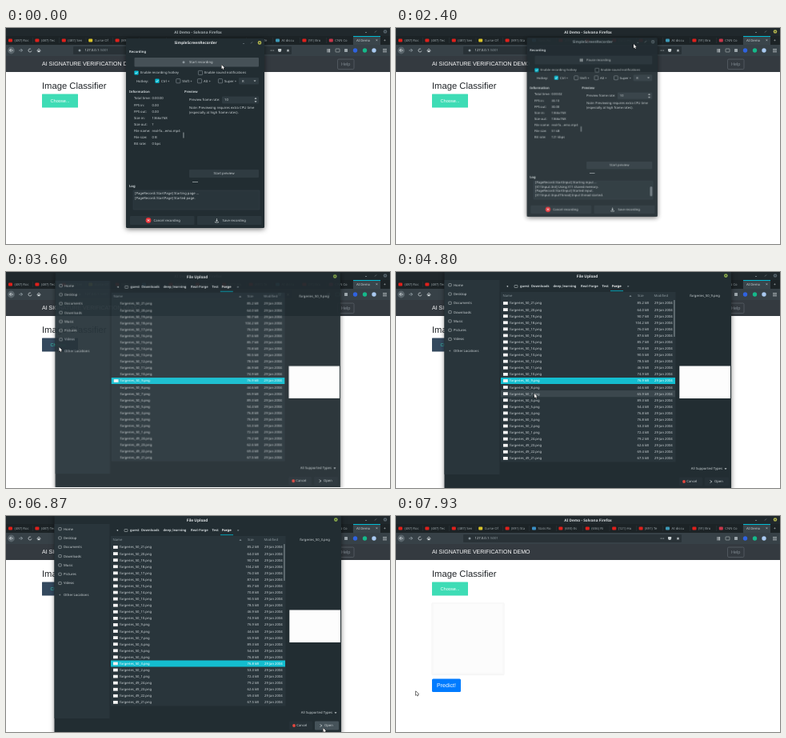
Recreate the animation shown at these times as an HTML page with a canvas. Size 480x270 px, loop 8 s.

```html
<!DOCTYPE html>
<html lang="en">
<head>
<meta charset="utf-8">
<title>AI Demo</title>
<style>
  html, body { margin: 0; width: 100%; height: 100%; overflow: hidden; background: #fff; }
  canvas { display: block; width: 480px; height: 270px; }
</style>
</head>
<body>
<canvas id="stage"></canvas>
<script>
const W = 480, H = 270, LOOP = 8000;
const UI = '"Noto Sans", sans-serif', WEB = '"Liberation Sans", Arial, sans-serif';
const SYMBOL = '"DejaVu Sans", sans-serif';
const TEAL = '#00bcd4', LIGHT = '#c9d0d3', DIM = '#8b979d', BASE = '#29353b', BG = '#222d32';
const ratio = window.devicePixelRatio || 1;

function prepare(canvas) {
  canvas.width = W * ratio;
  canvas.height = H * ratio;
  const context = canvas.getContext('2d');
  context.scale(ratio, ratio);
  context.textRendering = 'geometricPrecision';
  return context;
}
const screen2d = prepare(document.getElementById('stage'));
const layer2d = prepare(document.createElement('canvas'));
let ctx = screen2d;

const clamp = v => Math.max(0, Math.min(1, v));
const progress = (t, start, length) => clamp((t - start) / length);
const easeOut = p => 1 - (1 - p) ** 2;
const smooth = p => p * p * (3 - 2 * p);

// ---- drawing helpers ----
function box(x, y, w, h, fill, radius = 0, stroke) {
  ctx.beginPath();
  ctx.roundRect(x, y, w, h, radius);
  if (fill) { ctx.fillStyle = fill; ctx.fill(); }
  if (stroke) { ctx.strokeStyle = stroke; ctx.lineWidth = 0.5; ctx.stroke(); }
}
function dot(x, y, r, fill) { box(x - r, y - r, 2 * r, 2 * r, fill, r); }
function line(color, width, ...points) {
  ctx.beginPath();
  for (let i = 0; i < points.length; i += 2) ctx.lineTo(points[i], points[i + 1]);
  ctx.strokeStyle = color;
  ctx.lineWidth = width;
  ctx.stroke();
}
// y is the middle of the capitals
function text(s, x, y, { size = 4.22, color = LIGHT, bold = false, align = 'left', font = UI } = {}) {
  ctx.font = `${bold ? 'bold ' : ''}${size}px ${font}`;
  ctx.fillStyle = color;
  ctx.textAlign = align;
  ctx.fillText(s, x, y + size * 0.355);
}
function caret(x, y, up = false, color = LIGHT) {
  const d = up ? -1 : 1;
  ctx.beginPath();
  ctx.moveTo(x - 1.5, y - 0.8 * d);
  ctx.lineTo(x + 1.5, y - 0.8 * d);
  ctx.lineTo(x, y + 0.9 * d);
  ctx.fillStyle = color;
  ctx.fill();
}
function shadowBox(x, y, w, h, fill, radius, { color = 'rgba(0,0,0,.55)', blur = 6, drop = 1.5 } = {}) {
  ctx.save();
  ctx.shadowColor = color;
  ctx.shadowBlur = blur * ratio;
  ctx.shadowOffsetY = drop * ratio;
  box(x, y, w, h, fill, radius);
  ctx.restore();
}
// Draws a window off screen, then places it with one opacity and scale.
function composite(draw, alpha, scale, fromX, fromY, toX = fromX, toY = fromY) {
  if (alpha <= 0) return;
  ctx = layer2d;
  ctx.clearRect(0, 0, W, H);
  draw();
  ctx = screen2d;
  ctx.save();
  ctx.globalAlpha = alpha;
  ctx.translate(toX, toY);
  ctx.scale(scale, scale);
  ctx.drawImage(layer2d.canvas, -fromX, -fromY, W, H);
  ctx.restore();
}

// ---- pointer ----
const path = [
  [270, 269.5, 46], [1070, 300, 23.5], [1270, 300, 23.5], [1400, 297, 20], [2400, 297, 20],
  [3100, 66.5, 94], [3930, 66.5, 94], [4530, 173, 152], [4800, 173, 152], [5200, 175, 183],
  [5670, 175, 183], [5870, 340, 255], [6470, 393, 262], [6600, 396.5, 265], [6930, 396.5, 265],
  [7720, 24.7, 219]
];
function pointerAt(t) {
  const next = path.findIndex(k => k[0] > t);
  if (next === 0) return path[0].slice(1);
  if (next < 0) return path.at(-1).slice(1);
  const [t0, x0, y0] = path[next - 1], [t1, x1, y1] = path[next];
  const p = smooth((t - t0) / (t1 - t0));
  return [x0 + (x1 - x0) * p, y0 + (y1 - y0) * p];
}
function drawPointer(x, y) {
  ctx.save();
  ctx.translate(x, y);
  ctx.beginPath();
  for (const [px, py] of [[0, 0], [0, 5.2], [1.2, 4.1], [2.1, 6], [2.9, 5.6], [2.1, 3.8], [3.7, 3.7]]) ctx.lineTo(px, py);
  ctx.closePath();
  ctx.strokeStyle = '#111';
  ctx.lineWidth = 1;
  ctx.stroke();
  ctx.fillStyle = '#fff';
  ctx.fill();
  ctx.restore();
}

// ---- browser and page ----
const RED = '#e0201b';
const tabs = [
  ['(487) Roc', RED], ['(487) Tec', RED], ['(487) Sen', RED], ['Curse Of', '#d8c22a'], ['(891) Sta', RED],
  ['Stats Ro', '#3b8fc4'], ['(693) Es', RED], ['(656) Ri', RED], ['(121) Ho', RED], ['(891) Te', RED],
  ['AI discu', '#3c9ab8'], ['(91) Bro', RED], ['CNN Co', '#c8364a']
];
function windowButtons(x, y, active, gap = 12) {
  box(x - 2 * gap - 1, y + 0.6, 2, 0.6, DIM);
  line(DIM, 0.6, x - gap - 1, y + 1, x - gap + 1, y - 1);
  dot(x, y, 2.3, active ? '#b3b54c' : '#56636a');
  dot(x, y, 0.8, BG);
}
function drawBrowser(t) {
  const active = t > 2330 && (t < 3270 || t > 6900);
  box(0, 0, W, H, '#fff');
  box(0, 0, W, 10, '#20282c');
  text('AI Demo - Solvana Firefox', 240, 5, { size: 4.7, bold: true, align: 'center', color: active ? '#d5dadc' : '#a5aeb2' });
  windowButtons(474, 4.5, active);

  box(0, 10, W, 11, '#1c2326');
  tabs.forEach(([label, color], i) => {
    const x = 3 + 33.4 * i;
    box(x, 13.5, 5, 4, color, 1);
    text(label, x + 7.5, 15.5, { color: '#98a2a6' });
    box(x + 30, 12, 0.4, 7, '#333d42');
  });
  box(434, 10, 34, 11, '#3a454b');
  box(434, 10, 34, 0.9, TEAL);
  text('AI Demo', 438, 15.5);
  text('×', 462, 15.5, { size: 5 });
  text('+', 472, 15.5, { size: 5 });

  box(0, 21, W, 14, '#374147');
  dot(6.5, 28, 4.4, '#59646a');
  line(LIGHT, 0.8, 9, 28, 4.5, 28, 6.5, 26, 4.5, 28, 6.5, 30);
  line(DIM, 0.8, 16, 28, 20.5, 28, 18.5, 26, 20.5, 28, 18.5, 30);
  ctx.beginPath();
  ctx.arc(30, 28, 2, 0.2, 5.3);
  ctx.strokeStyle = LIGHT;
  ctx.lineWidth = 0.8;
  ctx.stroke();
  line(LIGHT, 0.8, 38.5, 28.3, 41, 26, 43.5, 28.3);
  box(39.5, 28, 3, 2.2, LIGHT);
  box(84, 23, 273, 10, '#293237', 1);
  dot(92, 28, 1.5, DIM);
  text('127.0.0.1', 98.5, 28);
  text(':5001', 117, 28, { color: DIM });
  for (let i = 0; i < 3; i++) dot(331 + 1.8 * i, 28, 0.5, LIGHT);
  box(340, 26, 4.2, 4, LIGHT, [0.5, 0.5, 2, 2]);
  text('★', 350, 28, { size: 5.5, font: SYMBOL });
  for (let i = 0; i < 3; i++) box(401.5 + 1.4 * i, 26, 0.8, 4.5, LIGHT);
  box(412, 26, 5, 4, null, 0.5, LIGHT);
  box(423, 26, 4, 4, '#9da7ac', 0.5);
  dot(436.5, 28, 2.7, '#2f63e0');
  dot(448.5, 28, 2.7, '#15b98a');
  dot(460, 28, 2.7, '#a9c9f0');
  for (let i = 0; i < 3; i++) box(471, 26 + 1.8 * i, 5, 0.7, LIGHT);

  box(0, 35, W, 20, '#343a40');
  text('AI SIGNATURE VERIFICATION DEMO', 45, 44.7, { size: 7.03, font: WEB, color: '#fff' });
  box(414.5, 39, 20.5, 12.5, null, 1.4, '#6c757d');
  text('Help', 424.7, 45, { size: 5.62, font: WEB, color: '#7c858c', align: 'center' });

  text('Image Classifier', 45, 71.8, { size: 11.24, font: WEB, color: '#212529' });
  const hovered = t > 2980 && t < 7150;
  box(45, 82.5, 45, 17, hovered ? '#34495e' : '#3edcb5', 0.5);
  text('Choose...', 67.5, 91, { size: 5.62, font: WEB, color: hovered ? '#39d2b4' : '#fff', align: 'center' });

  if (t > 7250) {
    shadowBox(45, 108, 90, 90, '#f8f8f8', 0, { color: 'rgba(0,0,0,.12)', blur: 1.5, drop: 0.7 });
    ctx.globalAlpha = progress(t, 7250, 650);
    box(46.7, 109.7, 86.6, 86.6, '#fcfcfc');
    ctx.globalAlpha = 1;
    box(45, 203.5, 36, 16.5, '#007bff', 1.5);
    text('Predict!', 63, 211.6, { size: 7.03, font: WEB, color: '#fff', align: 'center' });
  }
}

// ---- recorder ----
function checkbox(x, y, label, checked) {
  box(x - 2.6, y - 2.6, 5.2, 5.2, checked ? TEAL : null, 0.8, checked ? null : '#9aa5aa');
  if (checked) line('#fff', 0.7, x - 1.5, y, x - 0.4, y + 1.2, x + 1.6, y - 1.2);
  text(label, x + 5, y);
}
function button(x, y, w, h, label, fill = '#2c383e') {
  box(x, y, w, h, fill, 1);
  text(label, x + w / 2 + 6, y + h / 2, { align: 'center' });
}
function drawRecorder(t, pointer) {
  const recording = t >= 100, focused = t < 2330;
  const seconds = t < 870 ? 0 : t < 1870 ? 1 : 2;
  const fresh = recording && t > 270;
  const heading = (s, x, y) => text(s, x, y, { bold: true });

  shadowBox(150, 13, 173, 237, BG, 1.5);
  text('SimpleScreenRecorder', 237, 18.7, { size: 4.75, bold: true, align: 'center', color: focused ? '#e0e4e6' : DIM });
  windowButtons(317, 18.4, focused, 10);

  heading('Recording', 154, 30);
  const hover = pointer[1] > 37 && pointer[1] < 48;
  box(160.5, 37, 155.5, 11.5, hover ? '#465157' : '#2c383e', 1);
  if (recording) {
    box(220.5, 40.8, 1.2, 4, LIGHT);
    box(222.8, 40.8, 1.2, 4, LIGHT);
  } else dot(222, 42.8, 1.5, DIM);
  text(recording ? 'Pause recording' : 'Start recording', 229, 42.8);

  checkbox(163, 56, 'Enable recording hotkey', true);
  checkbox(243, 56, 'Enable sound notifications', false);
  text('Hotkey:', 163, 66.2);
  checkbox(189, 66.2, 'Ctrl +', true);
  checkbox(215.3, 66.2, 'Shift +');
  checkbox(242, 66.2, 'Alt +');
  checkbox(268, 66.2, 'Super +');
  box(291, 62, 25, 8.5, '#2f3b41', 1);
  text('R', 295, 66.2);
  caret(311, 66.2);

  heading('Information', 154, 80);
  [
    ['Total time:', `0:00:0${seconds}`],
    ['FPS in:', !fresh ? '0.00' : seconds < 2 ? '29.84' : '30.10'],
    ['FPS out:', !fresh ? '0.00' : '30.00'],
    ['Size in:', '1366x768'],
    ['Size out:', recording ? '1366x768' : '?'],
    ['File name:', 'real-fo...emo.mp4'],
    ['File size:', ['0 B', '36 kB', '51 kB'][seconds]],
    ['Bit rate:', ['0 bps', '118 kbps', '121 kbps'][seconds]]
  ].forEach(([label, value], i) => {
    text(label, 160, 88 + 8.1 * i);
    text(value, 182.5, 88 + 8.1 * i);
  });
  box(221.6, 130.5, 0.7, 7, LIGHT);

  heading('Preview', 223, 80);
  text('Preview frame rate:', 229, 90);
  box(270, 85.5, 46, 9, '#2f3b41', 1);
  text('10', 273, 90);
  caret(312, 88, true);
  caret(312, 92);
  text('Note: Previewing requires extra CPU time', 229, 99.7);
  text('(especially at high frame rates).', 229, 105.2);
  box(229, 177, 87, 10, '#2f3b41', 1);
  text('Start preview', 272.5, 182, { align: 'center' });
  box(233, 192.4, 7, 0.6, LIGHT);

  heading('Log', 154, 198);
  box(159, 203, 158, 24, BASE, 0.5, '#35434a');
  const log = recording
    ? ['[PageRecord::StartInput] Starting input ...', '[X11Input::Init] Using X11 shared memory.',
       '[PageRecord::StartInput] Started input.', '[X11Input::InputThread] Input thread started.']
    : ['[PageRecord::StartPage] Starting page ...', '[PageRecord::StartPage] Started page.'];
  const top = recording ? 204.3 : 207;
  log.forEach((entry, i) => text(entry, 161, top + 5.75 * i));
  if (recording) box(313, 210, 3.2, 13, '#69757b', 1.5);

  button(155, 235, 80.5, 11, 'Cancel recording');
  dot(178, 240.5, 3.4, '#e5353b');
  line('#fff', 0.9, 176.8, 239.3, 179.2, 241.7);
  line('#fff', 0.9, 179.2, 239.3, 176.8, 241.7);
  button(239, 235, 80.5, 11, 'Save recording');
  line(LIGHT, 0.7, 263.5, 238, 263.5, 241.5);
  caret(263.5, 241);
  line(LIGHT, 0.7, 261.5, 242, 261.5, 243, 265.5, 243, 265.5, 242);
}

// ---- file dialog ----
const sizes = [85.2, 64.0, 90.7, 104.2, 76.0, 87.6, 85.7, 70.8, 90.5, 78.5, 46.9, 74.9, 76.9,
  44.6, 65.9, 89.3, 54.4, 76.8, 76.8, 53.3, 72.4, 79.2, 62.6, 69.4, 67.5];
const fileName = i => `forgeries_${i < 21 ? `50_${21 - i}` : `49_${45 - i}`}.png`;
const ROW = 8.08;

function drawDialog(t, [px, py]) {
  const selected = t < 5230 ? 12 : 18;
  const iconsLoaded = t > 3700;
  shadowBox(60.5, -2, 358.5, 274, BG);
  text('File Upload', 239, 5, { size: 4.75, bold: true, align: 'center', color: '#e0e4e6' });
  dot(412.3, 4.6, 2.3, '#8fb04c');
  dot(412.3, 4.6, 0.8, BG);

  box(60.5, 10, 69, 243, BASE);
  ['Home', 'Desktop', 'Documents', 'Downloads', 'Music', 'Pictures', 'Videos'].forEach((place, i) => {
    const y = 16.2 + 11.3 * i;
    box(65.7, y - 1.6, 3.6, 3.2, null, 0.6, LIGHT);
    text(place, 72, y);
  });
  text('+', 66, 98.3);
  text('Other Locations', 72, 98.3);

  text('◂', 138, 18, { font: SYMBOL });
  box(148, 16.5, 4, 3, null, 0.5, LIGHT);
  const crumbs = [['guest', 155], ['Downloads', 169], ['deep_learning', 196.5], ['Real-Forge', 231], ['Test', 257.5], ['Forge', 270]];
  for (const [crumb, x] of crumbs) text(crumb, x, 18, { bold: true, size: 4.1, color: x === 270 ? '#fff' : LIGHT });
  box(268, 23.3, 16, 0.8, TEAL);
  text('▸', 289.5, 18, { font: SYMBOL, color: DIM });

  box(131, 25, 218.5, 212.5, BASE);
  text('Name', 133.5, 30, { color: DIM });
  caret(293, 30, true, DIM);
  text('Size', 302, 30, { color: DIM });
  text('Modified', 322.5, 30, { color: DIM });
  const hovered = px > 131 && px < 349 ? Math.floor((py - 35) / ROW) : -1;
  sizes.forEach((size, i) => {
    const y = 39 + ROW * i, color = i === selected ? '#fff' : LIGHT;
    if (i === selected) box(131, y - 4, 218, ROW, '#14bdcf');
    else if (i === hovered) box(131, y - 4, 218, ROW, '#3b474d');
    if (iconsLoaded || i === selected) box(134, y - 1.9, 5.8, 3.8, '#f4f4f4');
    text(fileName(i), 142, y, { color });
    text(`${size.toFixed(1)} kB`, 316, y, { color, align: 'right' });
    text('29 Jan 2004', 323, y, { color });
  });
  if (iconsLoaded) box(347.3, 35, 1.2, 46, '#7f8a8f', 0.6);

  text(fileName(selected), 386, 30, { align: 'center' });
  box(354.3, 117.5, 63.7, 40.5, '#fdfdfd');

  text('All Supported Types', 408, 246, { align: 'right' });
  caret(412, 246);
  const over = (a, b) => py > 256 && px >= a && px < b;
  box(354, 256.5, 29, 11, over(354, 383) ? '#3f4b51' : '#263137', 1);
  box(386, 256.5, 30, 11, over(386, 417) ? '#46535a' : '#263137', 1);
  dot(360, 262, 1.9, '#e5473f');
  text('Cancel', 363.3, 262);
  line(LIGHT, 0.7, 392.5, 260.5, 395, 262, 392.5, 263.5);
  text('Open', 398, 262);
}

// ---- timeline ----
function render(t) {
  const pointer = pointerAt(t);
  drawBrowser(t);

  const hide = progress(t, 2330, 300) ** 2;
  composite(() => drawRecorder(t, pointer), 1 - hide, 1 - hide, 236.5, 131.5, 236.5 + 155 * hide, 131.5 - 135 * hide);

  const shown = easeOut(progress(t, 3260, 440)) * (1 - easeOut(progress(t, 6880, 250)));
  composite(() => drawDialog(t, pointer), shown, 0.87 + 0.13 * shown, 239, 135);

  drawPointer(...pointer);
}
function tick() {
  render(performance.now() % LOOP);
  requestAnimationFrame(tick);
}
tick();
</script>
</body>
</html>
```
